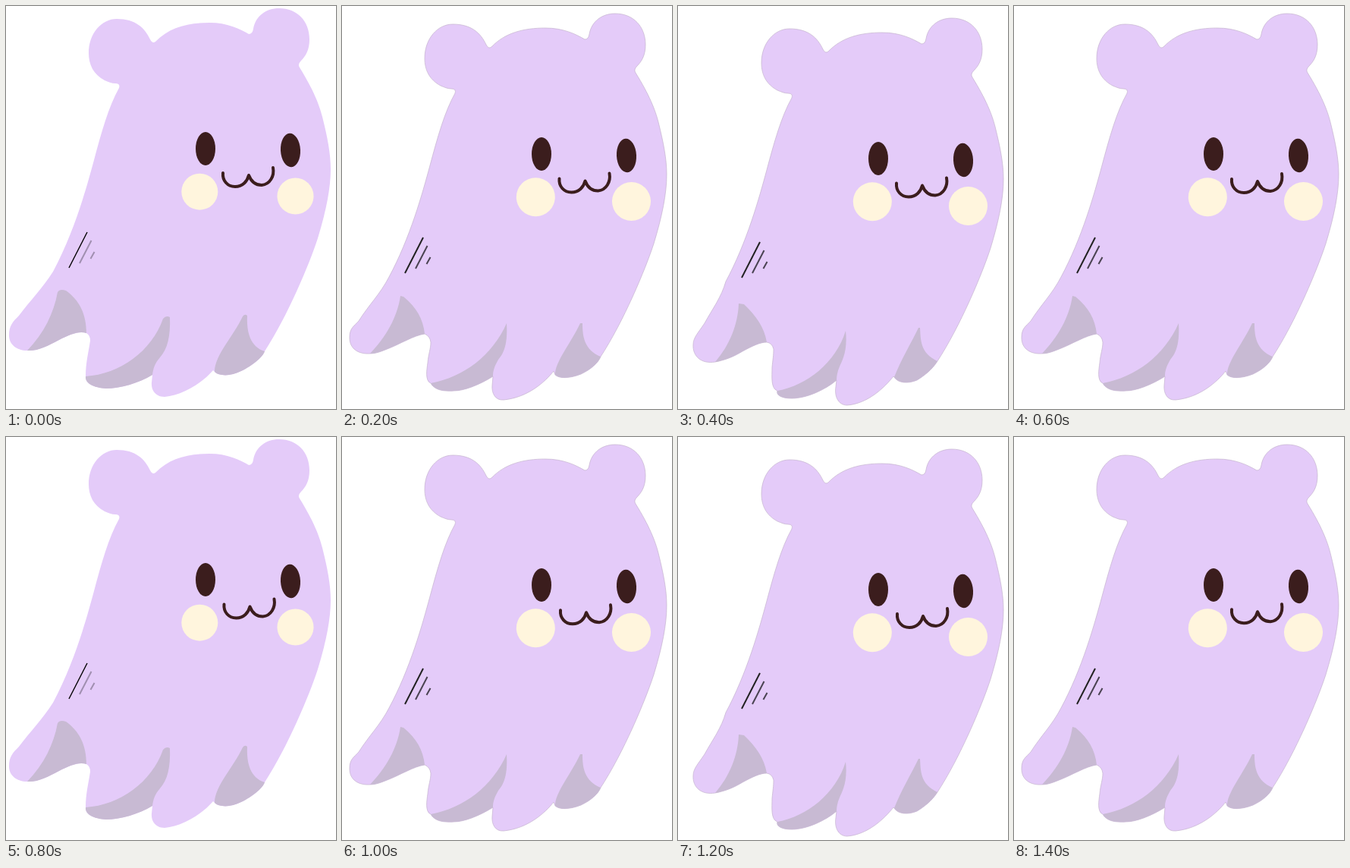
These frames come from a looping animation (435x531 px, 1.6 s). An HTML page:

```html
<!DOCTYPE html>
<html lang="en">
<head>
<meta charset="utf-8">
<title>Floating ghost</title>
<style>
  html, body { margin: 0; width: 100%; height: 100%; overflow: hidden; background: #fff; }
  svg { display: block; width: 100%; height: 100%; }
  .body { fill: #e4cbf9; }
  .edge { stroke: #c4b4ce; stroke-width: .7; }
  .shade { fill: #c8bad3; }
  .eye { fill: #3b1d1d; }
  .cheek { fill: #fff5dd; }
  #mouth { fill: none; stroke: #3b1d1d; stroke-width: 4; stroke-linejoin: round; stroke-linecap: round; }
</style>
</head>
<body>
<svg viewBox="0 0 435 531" preserveAspectRatio="none">
  <g id="ghost"></g>
  <path id="mouth" d="M286,220 C285,230 292,238 302,238 C312,238 318,231 320,223 C323,231 329,236 337,236 C348,235 354,224 352,213"/>
</svg>
<script>
const STEP = 200;

// Head and flanks, shared by every pose; ends where the right leg starts.
const HEAD = `M62,350 C90,298 106,240 116,203 C126,166 135,133 149,108
  Q151,102 144,102 C139,102 135,100 130,98 C115,90 109,77 109,62
  C109,36 126,17 146,17 C171,17 183,29 190,44 Q193,50 197,47
  C215,28 240,22 268,22 C292,22 308,30 320,37 Q325,37 326,30
  C329,13 343,3 360,3 C384,3 400,20 400,44 C400,58 395,66 389,72
  Q384,77 387,81 C405,110 413,130 417,146 C424,174 428,195 428,215
  C428,240 422,270 411,306 C400,340 371,409 341,455`;

// Legs run right to left: rim = lower edge, inner = shadow's upper edge,
// next = outline on to the following leg.
const POSES = [
  { dx: 0, dy: 0, cheek: 24, cheekY: 0, edge: false,
    marks: [['#000', 1.4], ['#a08fb0', 2], ['#a08fb0', 2]],
    legs: [
      { from: '341,455', rim: 'C339,462 325,474 310,481 C297,488 281,488 275,482',
        inner: 'C275,460 300,435 312,409 Q315,405 318,408 C317,430 322,449 341,455',
        next: 'L273,480 C258,497 235,512 209,515 C197,515 191,506 192,496 L193,486' },
      { from: '193,486', rim: 'C175,497 150,504 132,504 C115,503 104,497 105,488',
        inner: 'C150,485 192,455 207,412 Q211,407 216,410 C217,435 213,452 203,463 C196,471 194,478 193,486',
        next: 'C105,470 109,455 111,441 Q111,434 106,431' },
      { from: '106,431', rim: 'C95,428 85,433 70,440 C55,448 42,455 28,454',
        inner: 'C50,431 63,405 68,377 Q71,372 79,375 C96,387 106,405 106,431',
        next: 'C14,454 4,446 4,434 C4,421 9,416 17,408 C32,388 48,372 62,350' }
    ] },
  { dx: 0, dy: 7, cheek: 25.5, cheekY: 0, edge: true,
    marks: [['#222', 2], ['#4a4352', 2], ['#4a4352', 2]],
    legs: [
      { from: '341,462', rim: 'C338,470 328,479 315,485 C300,491 286,491 281,486',
        inner: 'C280,470 302,444 314,418 L317,418 C317,435 319,453 341,462',
        next: 'L279,481 C268,495 245,516 213,519 C202,520 197,510 198,500 L199,488' },
      { from: '199,488', rim: 'C180,500 160,507 148,507 C133,508 122,506 117,497',
        inner: 'C160,489 198,461 217,418 C219,450 211,460 206,466 C201,475 199,480 199,488',
        next: 'C109,494 112,478 113,470 C114,458 117,452 117,443 Q116,435 109,432' },
      { from: '109,432', rim: 'C95,434 75,446 62,451 C52,455 45,458 37,458',
        inner: 'C58,436 73,410 77,382 L81,383 C98,397 107,412 109,432',
        next: 'C22,459 10,452 10,437 C10,424 16,422 22,415 C36,393 50,380 62,357' }
    ] },
  { dx: 1, dy: 13, cheek: 25.5, cheekY: 0, edge: true,
    marks: [['#222', 2], ['#4a4352', 2], ['#4a4352', 2]],
    legs: [
      { from: '342,468', rim: 'C335,479 325,487 315,493 C303,498 290,497 285,489',
        inner: 'C294,466 308,443 317,424 L319,424 C320,440 319,457 342,468',
        next: 'L284,488 C272,503 250,524 223,526 C211,526 206,514 208,502 L209,493' },
      { from: '209,493', rim: 'C195,505 170,517 150,517 C137,517 129,513 131,507',
        inner: 'C170,500 208,470 221,428 C224,455 216,468 213,475 C210,482 209,488 209,493',
        next: 'C122,504 124,488 124,476 C125,466 126,460 126,452 Q124,444 117,443' },
      { from: '117,443', rim: 'C108,443 98,448 85,455 C72,463 60,467 49,469',
        inner: 'C68,447 79,420 80,392 L87,393 C103,408 114,424 117,443',
        next: 'C30,472 19,461 20,446 C20,437 27,430 35,418 C46,398 57,384 63,363' }
    ] }
];

const MARKS = ['M107,298 L83,345', 'M112.5,309 L97,339', 'M116.5,324 L111.5,333'];

// One row per step: pose, mouth x, mouth y.
const STEPS = [
  [0, 0, 0], [1, .5, 7.5], [2, 2, 13.5], [1, 1, 8],
  [0, 1.5, .5], [1, 2, 8.3], [2, 3, 13], [1, 1, 7.2]
];

const shift = (d, dx, dy) =>
  d.replace(/([\d.]+),([\d.]+)/g, (_, x, y) => `${+x + dx},${+y + dy}`);

function drawPose({ dx, dy, cheek, edge, marks, legs }) {
  const outline = shift(HEAD, dx, dy) + legs.map(l => l.rim + l.next).join('') + 'Z';
  const shades = legs.map(l =>
    `<path class="shade" d="M${l.from} ${l.rim} ${l.inner}Z"/>`).join('');
  const lines = MARKS.map((d, i) =>
    `<path d="${d}" stroke="${marks[i][0]}" stroke-width="${marks[i][1]}"/>`).join('');
  return `<g visibility="hidden">
    <path class="body${edge ? ' edge' : ''}" d="${outline}"/>${shades}
    <g transform="translate(${dx} ${dy})">${lines}
      <ellipse class="eye" cx="263" cy="188" rx="13" ry="22"/>
      <ellipse class="eye" cx="375" cy="190" rx="13" ry="22.3" transform="rotate(-3 375 190)"/>
      <circle class="cheek" cx="255.3" cy="244.7" r="${cheek}"/>
      <circle class="cheek" cx="381.5" cy="250.5" r="${cheek}"/>
    </g></g>`;
}

const ghost = document.getElementById('ghost');
const mouth = document.getElementById('mouth');
ghost.innerHTML = POSES.map(drawPose).join('');
const groups = [...ghost.children];

function show(ms) {
  const [pose, x, y] = STEPS[Math.floor(ms / STEP) % STEPS.length];
  groups.forEach((g, i) => g.setAttribute('visibility', i === pose ? 'visible' : 'hidden'));
  mouth.setAttribute('transform', `translate(${x} ${y})`);
}

const start = performance.now();
function tick() {
  show(performance.now() - start);
  requestAnimationFrame(tick);
}
tick();
</script>
</body>
</html>
```
